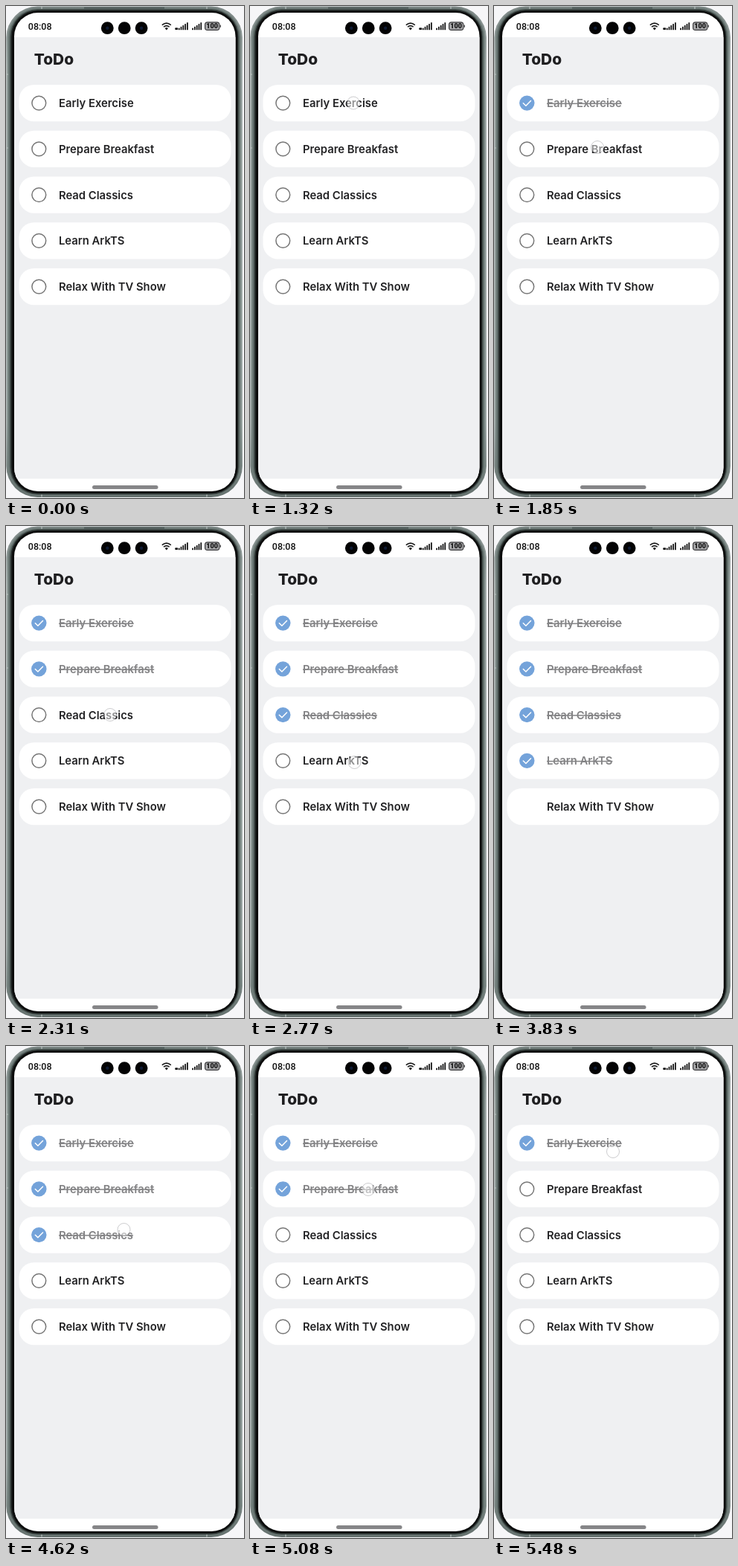
An HTML page that plays this animation: 320 px wide and 662 px high, repeating every 5540 ms.

```html
<!DOCTYPE html>
<html lang="en">
<head>
<meta charset="utf-8">
<title>ToDo</title>
<style>
  html, body { margin: 0; width: 100%; height: 100%; overflow: hidden; background: #f6f6f8; }
  svg { display: block; width: 100%; height: 100%; }
  .title { font: 800 20.8px Inter, sans-serif; fill: #1f1f21; }
  .clock { font: 500 12.5px Roboto, sans-serif; fill: #111; }
  .level { font: 800 9px Roboto, sans-serif; fill: #111; text-anchor: middle; }
  .label { font: 600 14.8px Inter, sans-serif; fill: #222224; }
  .done .label { fill: #828284; text-decoration: line-through 1px #707072; }
  .ring { fill: #fff; stroke: #777; stroke-width: 1.5; }
  .tick { display: none; }
  .done .tick { display: inline; }
  .done .ring, .blank .ring, .blank .tick { display: none; }
  .touch { fill: rgba(255, 255, 255, .5); stroke: rgba(110, 110, 115, .35); stroke-width: 1; }
</style>
</head>
<body>
<svg viewBox="0 0 320 662" preserveAspectRatio="none">
  <defs>
    <linearGradient id="metal" x2="0" y2="1">
      <stop offset="0" stop-color="#7d8886"/>
      <stop offset=".12" stop-color="#9ba5a3"/>
      <stop offset=".85" stop-color="#939e9c"/>
      <stop offset="1" stop-color="#64706d"/>
    </linearGradient>
    <clipPath id="screen"><rect x="11" y="9" width="297.5" height="644" rx="32"/></clipPath>
  </defs>

  <g id="phone">
    <rect x=".3" y=".6" width="317.6" height="660.4" rx="42" fill="url(#metal)"/>
    <rect x="2.6" y="2.6" width="313" height="656.4" rx="40" fill="#6c7976"/>
    <rect x="4.8" y="4" width="308.8" height="653.8" rx="38" fill="#4b5653"/>
    <rect x="6.4" y="5.2" width="305.8" height="651.4" rx="36" fill="#242a29"/>
    <rect x="7.8" y="6.4" width="303.4" height="649" rx="35" fill="#0b0c0c"/>
    <path d="M48 1v3M270 1v3M48 657.5v3M270 657.5v3M0 92h3M0 191h3" stroke="#b9c2c0" stroke-width="1.2"/>
    <path d="M105 2.6h108" stroke="#4a5654" stroke-width="1.6"/>
  </g>

  <g clip-path="url(#screen)">
    <rect x="11" y="9" width="298" height="645" fill="#fff"/>
    <rect x="11" y="42" width="298" height="594" fill="#eff0f2"/>
    <rect x="116" y="645" width="88.5" height="5" rx="2.5" fill="#858587"/>
  </g>

  <text class="clock" x="29.8" y="31.8">08:08</text>
  <g id="cameras"></g>
  <g fill="none" stroke="#181818" stroke-width="1.6">
    <path d="M209.8 25.7q6-5.2 12 0M212 28.2q3.8-3.2 7.6 0"/>
    <path d="M213.6 30a3.4 3.4 0 0 1 4.4 0l-2.2 2.6z" fill="#181818" stroke="none"/>
  </g>
  <g id="signal" fill="#181818"></g>
  <rect x="267.6" y="21.8" width="19.2" height="10.6" rx="3.2" fill="#a9a9ab" stroke="#3a3a3c" stroke-width="1.2"/>
  <path d="M288.3 25.4v3.4" stroke="#3a3a3c" stroke-width="1.3"/>
  <text class="level" x="277.2" y="30.4">100</text>

  <text class="title" x="37.8" y="78.8">ToDo</text>
  <g id="list"></g>
  <circle id="touch" class="touch" r="8.5"/>
</svg>

<script>
  const LOOP = 5540;
  const ICON_DELAY = 65; // the icon is missing briefly after each toggle
  const get = id => document.getElementById(id);

  const tasks = [
    { label: 'Early Exercise', check: 1380, uncheck: LOOP },
    { label: 'Prepare Breakfast', check: 1980, uncheck: 5150 },
    { label: 'Read Classics', check: 2440, uncheck: 4690 },
    { label: 'Learn ArkTS', check: 2840, uncheck: 4220 },
    { label: 'Relax With TV Show', check: 3230, uncheck: 3830 }
  ];

  const touches = [
    { from: 1320, to: 1380, x: 139, y: 130.5 },
    { from: 1780, to: 1980, x: 139, y: 190 },
    { from: 2310, to: 2440, x: 140, y: 254 },
    { from: 2710, to: 2840, x: 140.5, y: 318 },
    { from: 3100, to: 3230, x: 130, y: 378 },
    { from: 3760, to: 3830, x: 156, y: 376 },
    { from: 4090, to: 4220, x: 157, y: 312 },
    { from: 4560, to: 4690, x: 158.5, y: 247 },
    { from: 5020, to: 5150, x: 159, y: 193 },
    { from: 5410, to: LOOP, x: 160, y: 142 }
  ];

  get('cameras').innerHTML = [136.3, 159.2, 182.1].map((x, i) =>
    `<circle cx="${x}" cy="29.7" r="8.4" fill="#030304"/>` +
    (i === 1 ? '' : `<circle cx="${x}" cy="29.7" r="2.2" fill="#0e1a33"/>`)).join('');

  const bars = (x, count) => Array.from({ length: count }, (_, i) => {
    const height = 2.5 + i * 7.5 / (count - 1);
    return `<rect x="${x + i * 2.8}" y="${32.2 - height}" width="1.8" height="${height}"/>`;
  }).join('');
  get('signal').innerHTML =
    '<rect x="227.2" y="29.3" width="4" height="2.6" rx="1"/>' + bars(231.8, 5) + bars(250.2, 5);

  get('list').innerHTML = tasks.map(({ label }, i) => `
    <g transform="translate(0 ${130.6 + i * 61.75})">
      <rect x="17.5" y="-24.6" width="285" height="49.2" rx="20" fill="#fff"/>
      <circle class="ring" cx="44.3" r="9.4"/>
      <g class="tick">
        <circle cx="44.3" r="10.2" fill="#74a3da"/>
        <path d="M39.3 .1l3.6 3.5 6.6-6.7" fill="none" stroke="#fff" stroke-width="1.5" stroke-linecap="round" stroke-linejoin="round"/>
      </g>
      <text class="label" x="71" y="5.4">${label}</text>
    </g>`).join('');

  const rows = [...get('list').children];
  const touch = get('touch');
  const within = (t, from, to) => t >= from && t < to;

  function draw(t) {
    tasks.forEach(({ check, uncheck }, i) => {
      rows[i].classList.toggle('done', within(t, check, uncheck));
      rows[i].classList.toggle('blank',
        [check, uncheck].some(time => within(t, time, time + ICON_DELAY)));
    });
    const current = touches.find(({ from, to }) => within(t, from, to));
    touch.style.display = current ? '' : 'none';
    if (current) {
      touch.setAttribute('cx', current.x);
      touch.setAttribute('cy', current.y);
    }
  }

  const start = performance.now();
  function frame() {
    draw((performance.now() - start) % LOOP);
    requestAnimationFrame(frame);
  }
  frame();
</script>
</body>
</html>
```
